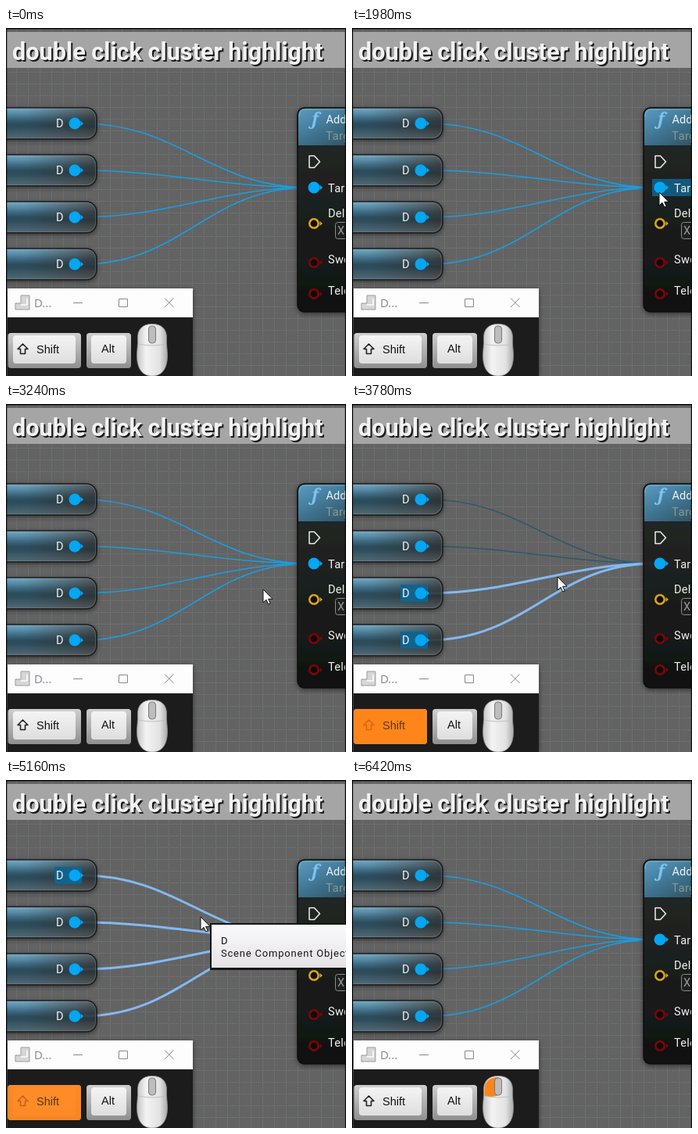
Write an HTML page that moves like this. It is 435 by 445 pixels and loops after 6.48 s.

```html
<!DOCTYPE html>
<html lang="en">
<head>
<meta charset="utf-8">
<title>Double click cluster highlight</title>
<style>
  html, body { margin: 0; width: 100%; height: 100%; overflow: hidden; background: #656565; }
  svg { display: block; width: 435px; height: 445px; }
  text { font: 14.5px Roboto, "Open Sans", sans-serif; fill: #f2f2f2; }
  .title { font-size: 30.65px; font-weight: 700; }
  .label { letter-spacing: .3px; }
  .key { font: 14.5px "Liberation Sans", Arial, sans-serif; fill: #111; }
  .tip text { font-size: 13px; letter-spacing: .8px; fill: #161616; }
  .wire { fill: none; stroke: #169fe3; stroke-width: 1.6; }
  .wire.dim { stroke: #2b596d; stroke-width: 1.5; }
  .wire.lit { stroke: #83b9f3; stroke-width: 3; }
</style>
</head>
<body>
<svg viewBox="0 0 435 445">
  <defs>
    <pattern id="minor" width="15" height="15" patternUnits="userSpaceOnUse" x="13" y="11">
      <path d="M.5 0V15M0 .5H15" stroke="#7b8283" stroke-dasharray="2 1" fill="none"/>
    </pattern>
    <linearGradient id="pill" x2="0" y2="1">
      <stop stop-color="#55a3cc"/><stop offset=".25" stop-color="#3a7797"/>
      <stop offset=".5" stop-color="#24495b"/><stop offset="1" stop-color="#2a4c5c"/>
    </linearGradient>
    <linearGradient id="shade">
      <stop offset=".2" stop-color="#282b2c" stop-opacity="0"/>
      <stop offset=".95" stop-color="#282b2c" stop-opacity=".85"/>
    </linearGradient>
    <linearGradient id="gloss" x2="0" y2="1">
      <stop stop-color="#fff" stop-opacity=".2"/><stop offset=".35" stop-color="#fff" stop-opacity=".03"/>
      <stop offset=".6" stop-color="#fff" stop-opacity="0"/><stop offset="1" stop-color="#fff" stop-opacity=".18"/>
    </linearGradient>
    <linearGradient id="body" x2="0" y2="1">
      <stop stop-color="#242826"/><stop offset="1" stop-color="#0e100f"/>
    </linearGradient>
    <linearGradient id="head" x2="1" y2="1">
      <stop stop-color="#5a9cc2"/><stop offset=".5" stop-color="#3d708c"/>
      <stop offset="1" stop-color="#2b4754"/>
    </linearGradient>
    <linearGradient id="cap" x2="0" y2="1">
      <stop stop-color="#f4f4f4"/><stop offset="1" stop-color="#dedede"/>
    </linearGradient>
    <linearGradient id="rim" x2="0" y2="1">
      <stop stop-color="#cfcfcf"/><stop offset="1" stop-color="#8f8f8f"/>
    </linearGradient>
    <linearGradient id="shell">
      <stop stop-color="#c4c4c4"/><stop offset=".3" stop-color="#f3f3f3"/>
      <stop offset=".75" stop-color="#e2e2e2"/><stop offset="1" stop-color="#aaa"/>
    </linearGradient>
    <linearGradient id="paper" x2="0" y2="1">
      <stop stop-color="#fbfafb"/><stop offset="1" stop-color="#e4e2e5"/>
    </linearGradient>
    <filter id="soft" x="-20%" y="-20%" width="140%" height="140%">
      <feDropShadow dx="0" dy="2" stdDeviation="3" flood-opacity=".5"/>
    </filter>
    <g id="pin">
      <circle r="7.5" fill="#04a7f3"/>
      <path d="M7.5-3.5L11 0L7.5 3.5Z" fill="#04a7f3"/>
    </g>
    <g id="ring">
      <circle r="5.7" fill="#0c0c0c" stroke="currentColor" stroke-width="2.6"/>
      <path d="M7.500-3L11 0L7.500 3Z" fill="currentColor"/>
    </g>
    <g id="node">
      <g opacity=".88" filter="url(#soft)">
        <rect x="-30" y="2" width="146" height="40" rx="13" fill="url(#pill)"/>
        <rect x="0" y="2" width="116" height="40" rx="13" fill="url(#shade)"/>
        <rect x="-30" y="2" width="146" height="40" rx="13" fill="url(#gloss)" stroke="#101213" stroke-width="1.500"/>
      </g>
      <rect x="-30" y="3.500" width="144.500" height="37" rx="11.500" fill="none" stroke="#9aa5a9" stroke-opacity=".3"/>
    </g>
    <path id="arrow" d="M21.500 404L28 410.500H24.500V416.500H18.500V410.500H15Z" fill="none" stroke-width="1.600" stroke-linejoin="round"/>
    <clipPath id="stage"><rect x="1" width="433" height="445"/></clipPath>
  </defs>

  <rect width="435" height="445" fill="#636363"/>
  <rect width="435" height="445" fill="url(#minor)" opacity=".55"/>

  <rect x="1" y="5" width="433" height="46" fill="#a5a5a5"/>
  <text class="title" x="10" y="43" style="fill:#1b1b1b">double click cluster highlight</text>
  <text class="title" x="8" y="41">double click cluster highlight</text>

  <g clip-path="url(#stage)">
    <g id="wires"></g>
    <g id="nodes"></g>

    <rect x="373" y="102" width="90" height="261" rx="9" fill="url(#body)" fill-opacity=".93" stroke="#0c0d0d" stroke-width="1.500" filter="url(#soft)"/>
    <path d="M374 150V112Q374 103 383 103H463V150Z" fill="url(#head)"/>
    <path d="M375 114Q375 104 384 104H435" fill="none" stroke="#9cc4d8" stroke-opacity=".5"/>
    <text x="389" y="124" style="font:italic 700 22px 'Noto Serif',serif;fill:#7fc3f5">ƒ</text>
    <text x="409.500" y="122" font-weight="700">AddLocalOffset</text>
    <text class="label" x="409" y="143" font-style="italic" style="fill:#8b9a8d;font-size:15px">Target is Scene Component</text>
    <path d="M388 163.500H394.500L401.500 171L394.500 178.500H388Z" fill="none" stroke="#eee" stroke-width="1.500" stroke-linejoin="round"/>
    <rect id="target" x="384" y="193" width="52" height="22" fill="#13597d"/>
    <use href="#pin" x="394" y="204"/>
    <use href="#ring" x="394" y="250" color="#dda41c"/>
    <rect x="421.500" y="248.500" width="40" height="21" rx="3" fill="#1d201f" stroke="#8c8c8c"/>
    <text x="424" y="264" style="fill:#9a9a9a">X</text>
    <use href="#ring" x="394" y="300" color="#7d0606"/>
    <use href="#ring" x="394" y="340" color="#7d0606"/>
    <g class="label">
      <text x="412" y="209.500">Target</text>
      <text x="412" y="241.500">Delta Location</text>
      <text x="412" y="300.500">Sweep</text>
      <text x="412" y="340.500">Teleport</text>
    </g>
  </g>

  <path d="M0 .75H435M.5 0V445M434.500 0V445" stroke="#0b0b0b" stroke-width="1.500"/>

  <g filter="url(#soft)">
    <rect x="2" y="333" width="237" height="38" fill="#fdfdfd"/>
    <rect x="2" y="370" width="237" height="75" fill="#1c1c1c"/>
  </g>
  <path d="M19 342H30V360H12V352H19Z" fill="#d6d6d6" stroke="#9a9a9a"/>
  <path d="M27 346V354H19" fill="none" stroke="#fff" stroke-width="1.500"/>
  <text x="36" y="357" style="font:15px 'Open Sans',sans-serif;fill:#85858f">D...</text>
  <path d="M86 351.500H98M144.500 346.500H155.500V356.500H144.500ZM203 345.500L214.500 357M214.500 345.500L203 357" fill="none" stroke="#888"/>

  <rect x="2.500" y="390" width="93.500" height="45" rx="4" fill="url(#rim)"/>
  <rect x="9" y="393" width="80" height="36" rx="4" fill="url(#cap)"/>
  <use href="#arrow" stroke="#222"/>
  <text class="key" x="39" y="416">Shift</text>
  <g id="shift">
    <rect x="2" y="390" width="94" height="45" rx="4" fill="#ff851b"/>
    <use href="#arrow" stroke="#d26a12"/>
    <text class="key" x="39" y="416" style="fill:#5c3a1c">Shift</text>
  </g>
  <rect x="103" y="390" width="57" height="45" rx="4" fill="url(#rim)"/>
  <rect x="109" y="393" width="45" height="36" rx="4" fill="url(#cap)"/>
  <text class="key" x="122" y="415">Alt</text>

  <path d="M187 378.500C174 378.500 168 386 168.500 397C169 405 167.500 411 167.500 419C167.500 435 174 445 187 445S206.500 435 206.500 419C206.500 411 205 405 205.500 397C206 386 200 378.500 187 378.500Z" fill="url(#shell)" stroke="#8d8d8d" stroke-width=".8"/>
  <path id="press" d="M187 380C176 380 169.500 386 169.500 396V404Q179 406 187 403.500Z" fill="#ff851b"/>
  <path d="M169 404Q187 408 205 404" fill="none" stroke="#c0c0c0"/>
  <rect x="182.500" y="381" width="9" height="22" rx="4" fill="#bdbdbd" stroke="#777"/>

  <g id="cursor">
    <g id="tip" class="tip">
      <rect x="12" y="8" width="270" height="60" fill="#151515"/>
      <rect x="14" y="10" width="266" height="55" fill="url(#paper)"/>
      <text x="26" y="35">D</text>
      <text x="26" y="51">Scene Component Object Reference</text>
    </g>
    <path d="M0 0V17L4 13.300L6.700 19L9.200 18L6.600 12.300H12Z" fill="#fff" stroke="#111"/>
  </g>
</svg>
<script>
  const LOOP = 6480, STEP = 60, MOVE = 240;
  const $ = id => document.getElementById(id);

  // Each row: pin height, and when its wire is hovered and joins the cluster
  const rows = [
    { from: 4440, to: 5820, lit: 4500 },
    { from: 4080, to: 4440, lit: 4260 },
    { from: 3600, to: 3960, lit: 3720 },
    { from: 3420, to: 3960, lit: 3540 }
  ].map((row, i) => ({ ...row, y: 122 + 60 * i }));

  const spots = {
    out: [445, 162], pin: [393, 210], empty: [394, 83], rest: [329, 237],
    wire4: [266, 238], wire3: [263, 221], wire2: [259, 178], wire1: [226, 138],
    read: [249, 175], back: [200, 134], clear: [330, 59]
  };
  // The pointer leaves for each spot at the given time
  const moves = [
    [180, 'pin'], [1320, 'empty'], [1680, 'pin'], [2160, 'empty'], [2940, 'rest'],
    [3240, 'wire4'], [3480, 'wire3'], [3900, 'wire2'], [4380, 'wire1'],
    [4740, 'read'], [5220, 'back'], [5700, 'clear'], [5940, 'out']
  ];
  const clicks = [660, 840, 1620, 2040, 2160, 2580, 3480, 3660, 4200, 4440, 5880, 6420];

  function wirePath(y) {
    const x1 = 97, x2 = 387, y2 = 204;
    const reach = (x2 - x1 + Math.abs(y2 - y)) / 3;
    return `M${x1} ${y}C${x1 + reach} ${y} ${x2 - reach} ${y2} ${x2} ${y2}`;
  }

  $('nodes').innerHTML = rows.map(({ y }) => `
    <use href="#node" y="${y - 22}"/>
    <rect class="hover" x="62" y="${y - 11}" width="35" height="22" fill="#12638c"/>
    <text x="64" y="${y + 5}">D</text>
    <use href="#pin" x="88" y="${y}"/>`).join('');
  $('wires').innerHTML = rows.map(({ y }) => `<path class="wire" d="${wirePath(y)}"/>`).join('');

  const hovers = document.querySelectorAll('.hover');
  const wires = document.querySelectorAll('.wire');

  const between = (t, a, b) => t >= a && t < b;
  const clamp = v => Math.max(0, Math.min(1, v));
  const show = (el, on) => { el.style.visibility = on ? 'visible' : 'hidden'; };

  function pointer(t) {
    let pos = spots.out;
    for (const [at, name] of moves) {
      const u = clamp((t - at) / MOVE), ease = u * u * (3 - 2 * u);
      pos = pos.map((v, k) => v + (spots[name][k] - v) * ease);
    }
    return pos.map(Math.round);
  }

  function wireState(row, t) {
    if (between(t, 900, 1680) || between(t, 2160, 2640)) return 'lit';
    if (!between(t, 3540, 5940)) return '';
    return t >= row.lit ? 'lit' : 'dim';
  }

  function draw(now) {
    const t = Math.floor(now % LOOP / STEP) * STEP;
    const [x, y] = pointer(t);
    $('cursor').setAttribute('transform', `translate(${x} ${y})`);
    show($('press'), clicks.some(at => between(t, at, at + STEP)));
    show($('target'), between(x, 384, 435) && between(y, 193, 216));
    show($('tip'), between(t, 5100, 5280));
    rows.forEach((row, i) => {
      show(hovers[i], between(t, row.from, row.to));
      wires[i].setAttribute('class', 'wire ' + wireState(row, t));
    });
    $('shift').style.opacity = clamp((t - 3240) / 120) * clamp((5460 - t) / 320);
  }

  const start = performance.now();
  function tick() {
    draw(performance.now() - start);
    requestAnimationFrame(tick);
  }
  tick();
</script>
</body>
</html>
```
